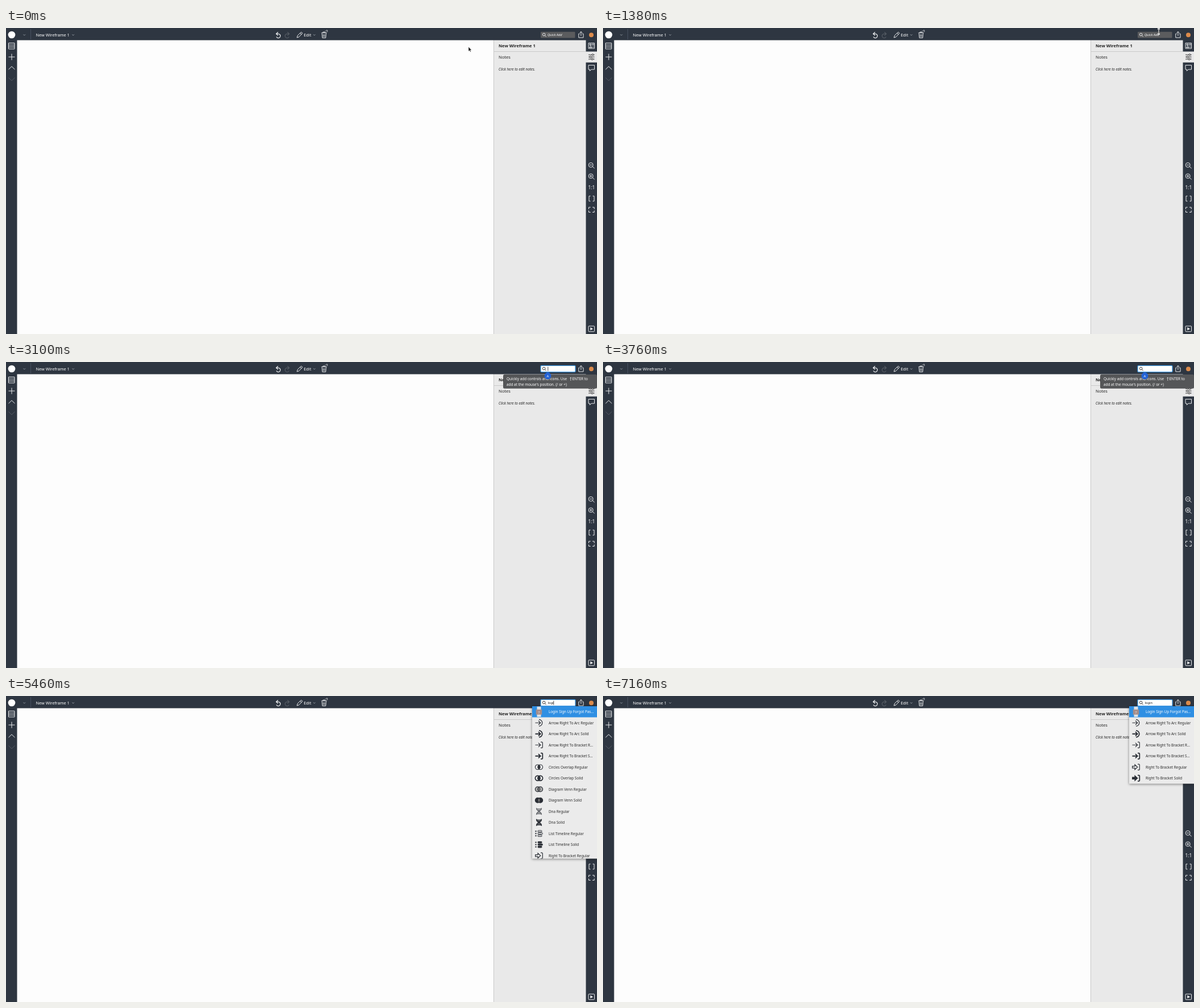
Write an HTML page that moves like this. It is 1039 px wide and 539 px high and loops after 8000 ms.

```html
<!DOCTYPE html>
<html lang="en">
<head>
<meta charset="utf-8">
<title>Quick add</title>
<style>
html, body { margin: 0; width: 100%; height: 100%; overflow: hidden; background: #fdfdfd; }
svg { display: block; width: 100vw; height: 100vh; font-family: "Noto Sans", "Open Sans", sans-serif; }
.line { fill: none; stroke: #e9ebed; stroke-width: 1; }
.dark { fill: none; stroke: #333; }
.dim { opacity: .2; }
.bar { fill: #2e3641; }
.title { font-size: 7.3px; font-weight: 500; fill: #fff; }
.row { font-size: 6.3px; fill: #2b2b2b; }
.num { font-size: 5px; fill: #eee; text-anchor: middle; }
.list { filter: drop-shadow(0 1px 2px #0007); }

/* one loop is 8 s, so 1% is 80 ms */
.anim { animation: 8s step-end infinite; }
.idle { animation-name: idle; }
.focus { animation-name: focus; }
.bubble { animation-name: bubble; }
.tip { animation-name: tip; }
.list-lo { animation-name: list-lo; }
.list-logi { animation-name: list-logi; }
.list-login { animation-name: list-login; }
.key-l { animation-name: key-l; }
.key-o { animation-name: key-o; }
.key-g { animation-name: key-g; }
.key-i { animation-name: key-i; }
.key-n { animation-name: key-n; }
.arrow { animation-name: arrow; }
.ibeam { animation-name: ibeam; }
.caret { animation-name: caret, blink; }
.pointer { animation: move 8s ease-in-out infinite; }

@keyframes idle { 0% { visibility: visible } 35%, to { visibility: hidden } }
@keyframes focus { 0% { visibility: hidden } 35%, to { visibility: visible } }
@keyframes bubble { 0% { visibility: hidden } 35% { visibility: visible } 47.5%, to { visibility: hidden } }
@keyframes tip { 0% { visibility: hidden } 36.5% { visibility: visible } 59.4%, to { visibility: hidden } }
@keyframes list-lo { 0% { visibility: hidden } 47.5% { visibility: visible } 59.4%, to { visibility: hidden } }
@keyframes list-logi { 0% { visibility: hidden } 59.4% { visibility: visible } 70.6%, to { visibility: hidden } }
@keyframes list-login { 0% { visibility: hidden } 70.6%, to { visibility: visible } }
@keyframes key-l { 0% { visibility: hidden } 47.5%, to { visibility: visible } }
@keyframes key-o { 0% { visibility: hidden } 53.7%, to { visibility: visible } }
@keyframes key-g { 0% { visibility: hidden } 59.4%, to { visibility: visible } }
@keyframes key-i { 0% { visibility: hidden } 65.6%, to { visibility: visible } }
@keyframes key-n { 0% { visibility: hidden } 70.6%, to { visibility: visible } }
@keyframes arrow { 0% { visibility: visible } 11%, to { visibility: hidden } }
@keyframes ibeam { 0% { visibility: hidden } 11% { visibility: visible } 35%, to { visibility: hidden } }
@keyframes move {
  0%, 2.5% { transform: translate(813px, 33px) }
  12.5%, 21% { transform: translate(977px, 6px) }
  27%, to { transform: translate(977px, 11.5px) }
}
@keyframes caret {
  0% { transform: translateX(0) }
  47.5% { transform: translateX(1.5px) }
  53.7% { transform: translateX(5px) }
  59.4% { transform: translateX(8.5px) }
  65.6% { transform: translateX(10px) }
  70.6%, to { transform: translateX(13.6px) }
}
@keyframes blink {
  0% { visibility: hidden }
  35% { visibility: visible } 41.2% { visibility: hidden }
  47.5% { visibility: visible } 76.9% { visibility: hidden }
  83.1% { visibility: visible } 89.3% { visibility: hidden }
  95.6%, to { visibility: visible }
}
</style>
</head>
<body>
<svg viewBox="0 0 1039 539" preserveAspectRatio="none">
  <rect width="1039" height="539" fill="#fdfdfd"/>

  <!-- notes panel -->
  <rect x="857" y="21" width="163" height="518" fill="#e9e9e9"/>
  <path d="M857.5 21V539M857 41.5H1020" stroke="#c9c9c9" fill="none"/>
  <text x="866" y="34" font-size="7.5" font-weight="700" fill="#222">New Wireframe 1</text>
  <text x="866" y="54" font-size="7.5" fill="#222">Notes</text>
  <text x="866" y="74.5" font-size="6.25" font-style="italic" fill="#222">Click here to edit notes.</text>

  <!-- bars -->
  <path class="bar" d="M0 0H1039V539H1019.5V21.5H19.5V539H0Z"/>
  <rect x="1019" y="41.5" width="20" height="19.2" fill="#e9e9e9"/>
  <path d="M43.5 2V20" stroke="#485260"/>

  <!-- top left -->
  <circle cx="10" cy="12" r="6.3" fill="#fff"/>
  <path class="line" stroke-width=".8" d="M30.5 11.3l1.8 1.8 1.8-1.8M116.3 11.3l1.8 1.8 1.8-1.8M540.3 11.3l1.8 1.8 1.8-1.8" style="stroke:#aab0b8;stroke-width:.8"/>
  <text class="title" x="52.5" y="15">New Wireframe 1</text>

  <!-- left tools -->
  <path class="line" d="M4.5 26.5H15V36.9H4.5ZM4.5 30H15M4.5 33.4H15M4.5 51H15.5M10 45.5V56.5M4.5 73L10 67.7L15.5 73"/>
  <path class="line dim" d="M4.5 87.5L10 92.8L15.5 87.5"/>

  <!-- top centre -->
  <path id="undo" class="line" d="M478.3 7.2L475 10.3L478.3 13.4M475.3 10.3H479.4A3.7 3.7 0 1 1 475.4 15.5" style="stroke-width:1.3"/>
  <use href="#undo" class="dim" transform="matrix(-1 0 0 1 973 0)"/>
  <path class="line" d="M511.6 17L512.6 13.3L518.3 7.6Q519.2 6.9 520.1 7.8Q521.4 9 520.6 9.9L515 15.8ZM517 9L519.4 11.4"/>
  <text class="title" x="523.5" y="15">Edit</text>
  <path class="line" d="M555.5 9.5L556.2 17.4H562L562.8 9.5M554.5 8.6H564M557.2 8.5V7H561V8.5M557.9 11V15.8M560.2 11V15.8"/>
  <path class="line" stroke-dasharray="1 1" d="M561 5.2H565.5M563.5 3.8H565.5M564.8 4V8"/>

  <!-- quick add, share, account -->
  <g class="anim idle">
    <rect x="940" y="6.8" width="60.5" height="10.6" rx="1" fill="#5b5c5e"/>
    <path class="line" d="M947.5 13.3L949.7 15.3"/><circle class="line" cx="945.7" cy="11.5" r="2.3"/>
    <text x="952" y="14.2" font-size="5.7" font-weight="500" font-style="italic" fill="#fff">Quick Add</text>
  </g>
  <path class="line" d="M1008.7 10.2H1006.8V17H1015V10.2H1013.1M1010.9 14V6.5M1008.6 8.7L1010.9 6.3L1013.2 8.7"/>
  <circle cx="1029" cy="12.3" r="4" fill="#dc8b4b"/>

  <!-- right tools -->
  <path class="line" d="M1024 26.5H1034.5V36H1024ZM1025.6 34.5L1028 31.3L1030 34.5ZM1026 28.4H1029V30.2H1026ZM1031 33.5H1033.2"/>
  <circle class="line" cx="1032" cy="29.3" r="1.2"/>
  <g class="dark">
    <path d="M1024 47.2H1030M1033 47.2H1034.7M1024 51H1026M1029 51H1034.7M1024 54.8H1029M1032 54.8H1034.7"/>
    <circle cx="1031.4" cy="47.2" r="1.5"/><circle cx="1027.5" cy="51" r="1.5"/><circle cx="1030.5" cy="54.8" r="1.5"/>
  </g>
  <path class="line" d="M1024 65.5H1034.5V73H1029L1026.3 75.7V73H1024ZM1031.3 244.2L1034.6 247.2M1026 241.3H1030.5M1031.3 263.7L1034.6 266.7M1026 260.8H1030.5M1028.2 258.6V263M1027.5 296H1025V305H1027.5M1031.5 296H1034V305H1031.5"/>
  <circle class="line" cx="1028.2" cy="241.3" r="4"/><circle class="line" cx="1028.2" cy="260.8" r="4"/>
  <text x="1023.5" y="284" font-size="8.2" fill="#fff">1:1</text>
  <path class="line" d="M1024.5 319V315.8H1027.7M1031 315.8H1034.2V319M1034.2 321.5V324.5H1031M1027.7 324.5H1024.5V321.5"/>
  <rect class="line" x="1024" y="525" width="10.5" height="9.8" rx="1"/>
  <path d="M1027.3 527.2L1032 529.9L1027.3 532.6Z" fill="#fff"/>

  <g id="lists"></g>

  <!-- focused field -->
  <g class="anim focus">
    <rect x="940" y="6.4" width="61" height="11.2" rx="1.3" fill="#fff" stroke="#3b93dc" stroke-width="1.3"/>
    <g class="dark"><path d="M947.5 13.3L949.7 15.3"/><circle cx="945.7" cy="11.5" r="2.3"/></g>
  </g>
  <text x="952.5" y="14.2" font-size="5.75" fill="#222"><tspan class="anim key-l">l</tspan><tspan class="anim key-o">o</tspan><tspan class="anim key-g">g</tspan><tspan class="anim key-i">i</tspan><tspan class="anim key-n">n</tspan></text>
  <path class="anim caret" d="M952.8 8.5V15.8" stroke="#222" stroke-width=".8"/>

  <!-- hint -->
  <g class="anim tip">
    <rect x="874" y="22" width="165" height="24.7" rx="2.5" fill="#555658"/>
    <g font-size="6.4" fill="#fff">
      <text x="880" y="32.3">Quickly add controls and icons. Use</text>
      <text x="995.5" y="32.3">ENTER to</text>
      <text x="880" y="41.6">add at the mouse's position. (/ or +)</text>
    </g>
    <path class="line" d="M992.8 33V27M991.5 28.6L992.8 27L994.1 28.6" style="stroke-width:.8"/>
  </g>
  <g class="anim bubble">
    <path d="M952.5 17.5L955 19A6 6 0 1 1 950 19Z" fill="#2463d4"/>
    <text x="952.5" y="26.7" font-size="6" text-anchor="middle" fill="#fff">A</text>
  </g>

  <!-- mouse -->
  <g class="pointer">
    <path class="anim arrow" d="M0 0V8.3L1.9 6.6L3.2 9.3L4.5 8.7L3.2 6.1H5.6Z" fill="#111" stroke="#fff" stroke-width=".6"/>
    <g class="anim ibeam" fill="none">
      <path id="beam" d="M-2-4.7Q0-4.7 0-3.3Q0-4.7 2-4.7M0-3.3V3.3M-2 4.7Q0 4.7 0 3.3Q0 4.7 2 4.7" stroke="#e4e4e4" stroke-width="1.9"/>
      <use href="#beam"/>
      <path d="M0-4V4" stroke="#333" stroke-width=".7"/>
    </g>
  </g>
</svg>
<script>
const ROW = 19.5, TOP = 18, LEFT = 925;
const INK = '#2b2f36';

// Icon parts, drawn around (0, 0)
const path = (d, width = 1.2, fill = 'none', stroke = INK) =>
  `<path d="${d}" fill="${fill}" stroke="${stroke}" stroke-width="${width}"/>`;
const disc = (x, r, fill, width = 1.2) =>
  `<circle cx="${x}" r="${r}" fill="${fill}" stroke="${INK}" stroke-width="${width}"/>`;
const box = (x, y, w, h, fill) => `<rect x="${x}" y="${y}" width="${w}" height="${h}" fill="${fill}"/>`;

const arrowTo = (end, w) => path('M-6.5 0H2.5M-1-3.7L2.7 0L-1 3.7' + end, w);
const arc = w => arrowTo('M0-5.8A5.8 5.8 0 0 1 0 5.8', w);
const bracket = w => arrowTo('M3-5.2H5Q6.3-5.2 6.3-4V4Q6.3 5.2 5 5.2H3', w);
const blockArrow = (fill, w) =>
  path('M-6.3-1.7H-2V-4.3L2.7 0L-2 4.3V1.7H-6.3Z', 1.2, fill) +
  path('M3-5.2H5Q6.3-5.2 6.3-4V4Q6.3 5.2 5 5.2H3', w);
const rings = (fill, lens, w) => disc(-2.3, 4.3, fill, w) + disc(2.3, 4.3, fill, w) +
  path('M0-3.6A4.3 4.3 0 0 1 0 3.6A4.3 4.3 0 0 1 0-3.6Z', w * .7, lens);
const dna = w => path('M-4.2-6V-4.5C-4.2 0 4.2 0 4.2 4.5V6M4.2-6V-4.5C4.2 0-4.2 0-4.2 4.5V6M-4-4.2H4M-2.8-2H2.8M-2.8 2H2.8M-4 4.2H4', w);
const timeline = fill => path('M-5.5-5V-3M-5.5-1V1M-5.5 3V5', 2.2) +
  [-4, 0, 4].map((y, i) => `<rect x="-2" y="${y - 1.3}" width="${i == 1 ? 8.4 : 7}" height="2.6" rx="1" fill="${fill}" stroke="${INK}"/>`).join('');
const folder = (n, tint = '#dedede') => box(-8, -8, 16, 16, tint) +
  path('M-7-6.5H-3M0-6H4M-7 6.5H-4', .8, 'none', '#b5b5b5') +
  path('M-5.5-3.7H-1.5L-.3-2.5H5.5V5H-5.5Z', .6, '#8b8d91', '#8b8d91') +
  `<text class="num" y="2.8">${n}</text>`;
const loginFolder = box(-3.5, -9, 7, 18, '#dfe2e5') + box(-5.2, -4, 10.4, 9, '#a58e8b') + '<text class="num" y="2.8">7</text>';
const scribble = (rows, dash) =>
  `<g stroke-dasharray="${dash}">${path(rows.map(y => `M-8 ${y}H8`).join(''), 1, 'none', '#555')}</g>`;

const arrows = [
  ['Login Sign Up Forgot Pas...', loginFolder],
  ['Arrow Right To Arc Regular', arc(1.2)],
  ['Arrow Right To Arc Solid', arc(1.8)],
  ['Arrow Right To Bracket R...', bracket(1.2)],
  ['Arrow Right To Bracket S...', bracket(1.8)],
];
const rightTo = [
  ['Right To Bracket Regular', blockArrow('none', 1.2)],
  ['Right To Bracket Solid', blockArrow(INK, 1.8)],
];
const lists = {
  lo: [
    ['', disc(0, 8, '#16191d')],
    ['Color Picker', box(-6.5, -6, 13, 11, '#1f55d8') + path('M1 2H7V6H4L2.5 7Z', .5, '#111')],
    ['Cover Flow', path('M-8-3V3M-5-2.5V3M-8 2H-4M3-2H8M4-2V3M8-3V3', .9, 'none', '#555')],
    ['Squiggly Block of Text', scribble([-2, 0, 2], '2 .6')],
    ['Tag Cloud', scribble([-1.7, 1.5], '2.5 1 1 1')],
    ['Circle Button', disc(0, 8.2, '#ccc') + path('M-3.5 0H3.5M0-3.5V3.5')],
    ['Shape', disc(0, 8.2, '#fff', 1.4)],
    ['Tooltip', path('M-6.5-2.3H6.5Q8.3-2.3 8.3 0T6.5 2.3H-4L-6 3.5V2.3H-6.5Q-8.3 2.3-8.3 0T-6.5-2.3ZM-4 0H-1M0 0H4', 1, '#fff')],
    ['Window', box(-8.5, -7.5, 17, 15, '#fafafa')],
    ['Local Reviews Mobile App', folder(13)],
    ['Login Sign Up Forgot Pas...', folder(7, '#e5e5e5')],
    ['Logos', folder(5)],
    ['Blog', folder(2)],
    ['Color Pickers', folder(4) + '<circle cx="5" cy="-3" r="2.5" fill="#d7a145"/>'],
  ],
  logi: [
    ...arrows,
    ['Circles Overlap Regular', rings('none', INK, 1.1)],
    ['Circles Overlap Solid', rings('none', INK, 1.7)],
    ['Diagram Venn Regular', rings('#aaa', '#777', 1.2)],
    ['Diagram Venn Solid', rings(INK, '#777', 1.2)],
    ['Dna Regular', dna(1)],
    ['Dna Solid', dna(1.7)],
    ['List Timeline Regular', timeline('none')],
    ['List Timeline Solid', timeline(INK)],
    rightTo[0],
  ],
  login: [...arrows, ...rightTo],
};

const drawList = (name, rows) => {
  const height = Math.min(rows.length * ROW, 268.5);
  const items = rows.map(([label, icon], i) => {
    const y = TOP + (i + .5) * ROW;
    return `<g transform="translate(${LEFT + 12} ${y})">${icon}</g>
      <text class="row" x="${LEFT + 29}" y="${y + 2.3}"${i ? '' : ' style="fill:#fff"'}>${label}</text>`;
  }).join('');
  return `<g class="anim list-${name}"><g class="list">
    <clipPath id="clip-${name}"><rect x="${LEFT}" y="${TOP}" width="114" height="${height}"/></clipPath>
    <rect x="${LEFT}" y="${TOP}" width="114" height="${height}" fill="#ebebeb"/>
    <rect x="${LEFT}" y="${TOP}" width="114" height="${ROW}" fill="#2f8fe3"/>
    <g clip-path="url(#clip-${name})">${items}</g></g></g>`;
};
document.getElementById('lists').innerHTML =
  Object.entries(lists).map(([name, rows]) => drawList(name, rows)).join('');
</script>
</body>
</html>
```
